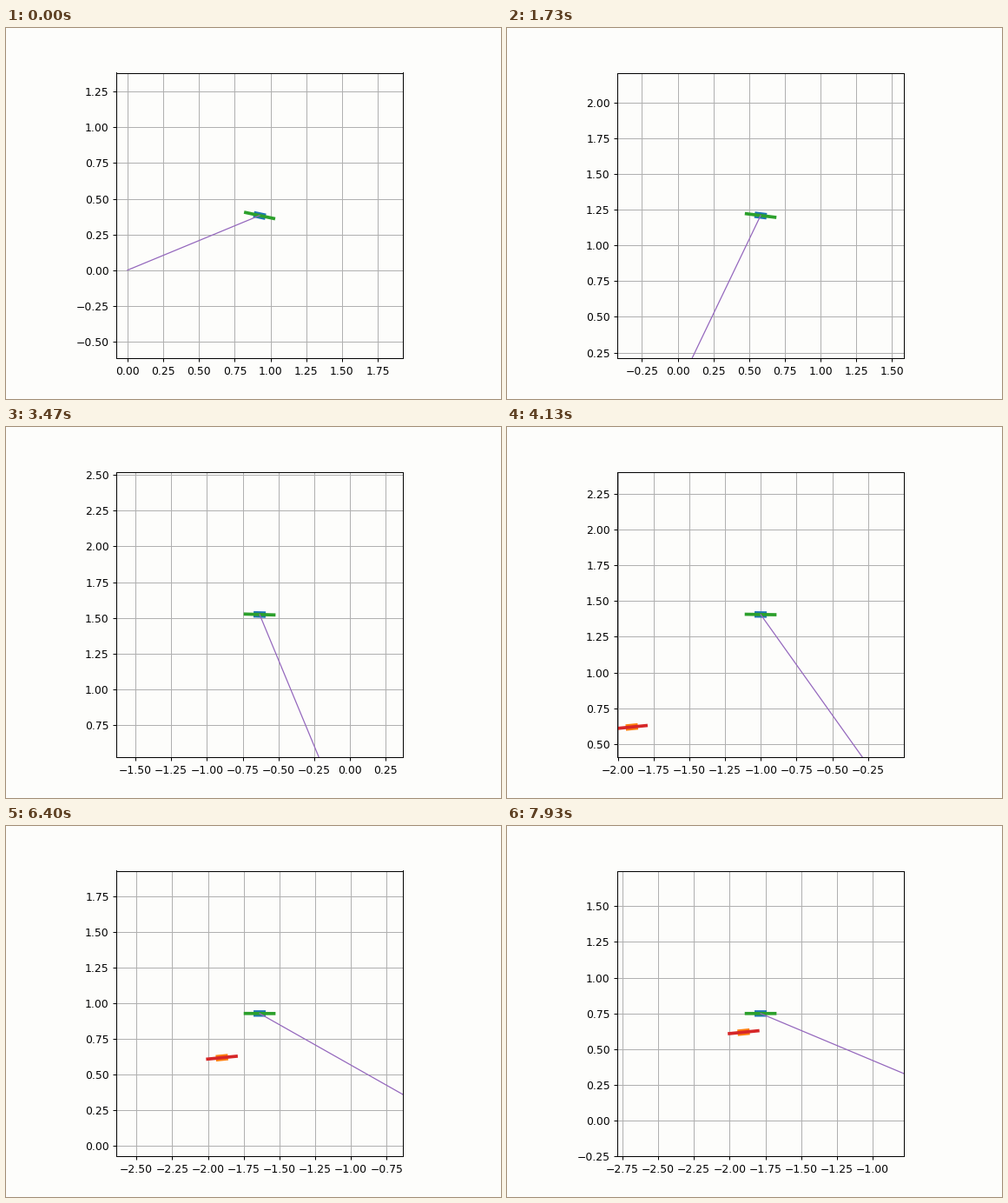
A matplotlib script for the animation above (8 s loop, 570 px wide and 427 px high).

```python
import numpy as np
import matplotlib.pyplot as plt
from matplotlib.animation import FuncAnimation
from matplotlib.ticker import MultipleLocator

W, H, DPI = 570, 427, 89.0625
FRAMES, INTERVAL = 200, 40
RATE = 15                   # poses per second
PAPER = "#fdfdfb"
LEFT, RIGHT, TOP, BOTTOM = 127.4, 456.7, 51.5, 380.1

START_R, START_ANGLE = 1.0, np.pi / 8
GOAL_R, GOAL_ANGLE = 2.0, 0.9 * np.pi
GOAL_TILT = np.radians(5.6)
SLOW, FAST = 0.375, 1.66    # decay rates of the tether length error
BODY, ROTOR = 0.02, 0.1     # half lengths


def polar(r, angle):
    return np.array([r * np.cos(angle), r * np.sin(angle)])


def pose(t):
    """Position and tilt of the craft after t seconds."""
    gap = (FAST * np.exp(-SLOW * t) - SLOW * np.exp(-FAST * t)) / (FAST - SLOW)
    r = GOAL_R - (GOAL_R - START_R) * gap
    swing = np.exp(-t**2 / (4.99 + 2.047 * t - 0.0408 * t**2))
    angle = GOAL_ANGLE - (GOAL_ANGLE - START_ANGLE) * swing
    tilt = -0.8 + 0.1 * t - 11.2 * np.exp(-t**2 / 5.4)
    return polar(r, angle), np.radians(tilt)


def bar(center, tilt, half):
    d = polar(half, tilt)
    return np.column_stack([center - d, center + d])


fig = plt.figure(figsize=(W / DPI, H / DPI), dpi=DPI, facecolor=PAPER)
ax = fig.add_axes([LEFT / W, 1 - BOTTOM / H, (RIGHT - LEFT) / W, (BOTTOM - TOP) / H])
ax.set_facecolor(PAPER)
ax.xaxis.set_major_locator(MultipleLocator(0.25))
ax.yaxis.set_major_locator(MultipleLocator(0.25))
ax.grid(True)

goal = polar(GOAL_R, GOAL_ANGLE)
body, = ax.plot([], [], color="tab:blue", lw=6)
ax.plot(*bar(goal, GOAL_TILT, BODY), color="tab:orange", lw=6)
rotor, = ax.plot([], [], color="tab:green", lw=3)
ax.plot(*bar(goal, GOAL_TILT, ROTOR), color="tab:red", lw=3)
tether, = ax.plot([], [], color="tab:purple", lw=1)


def draw(i):
    # the pose advances in whole steps, nearest to the current time
    step = round(i * INTERVAL * RATE / 1000)
    pos, tilt = pose(step / RATE)
    body.set_data(*bar(pos, tilt, BODY))
    rotor.set_data(*bar(pos, tilt, ROTOR))
    tether.set_data([0, pos[0]], [0, pos[1]])
    ax.set_xlim(pos[0] - 1, pos[0] + 1)
    ax.set_ylim(pos[1] - 1, pos[1] + 1)
    return body, rotor, tether


anim = FuncAnimation(fig, draw, frames=FRAMES, interval=INTERVAL,
                     init_func=lambda: draw(0), repeat=True, repeat_delay=0)
plt.show()
```
